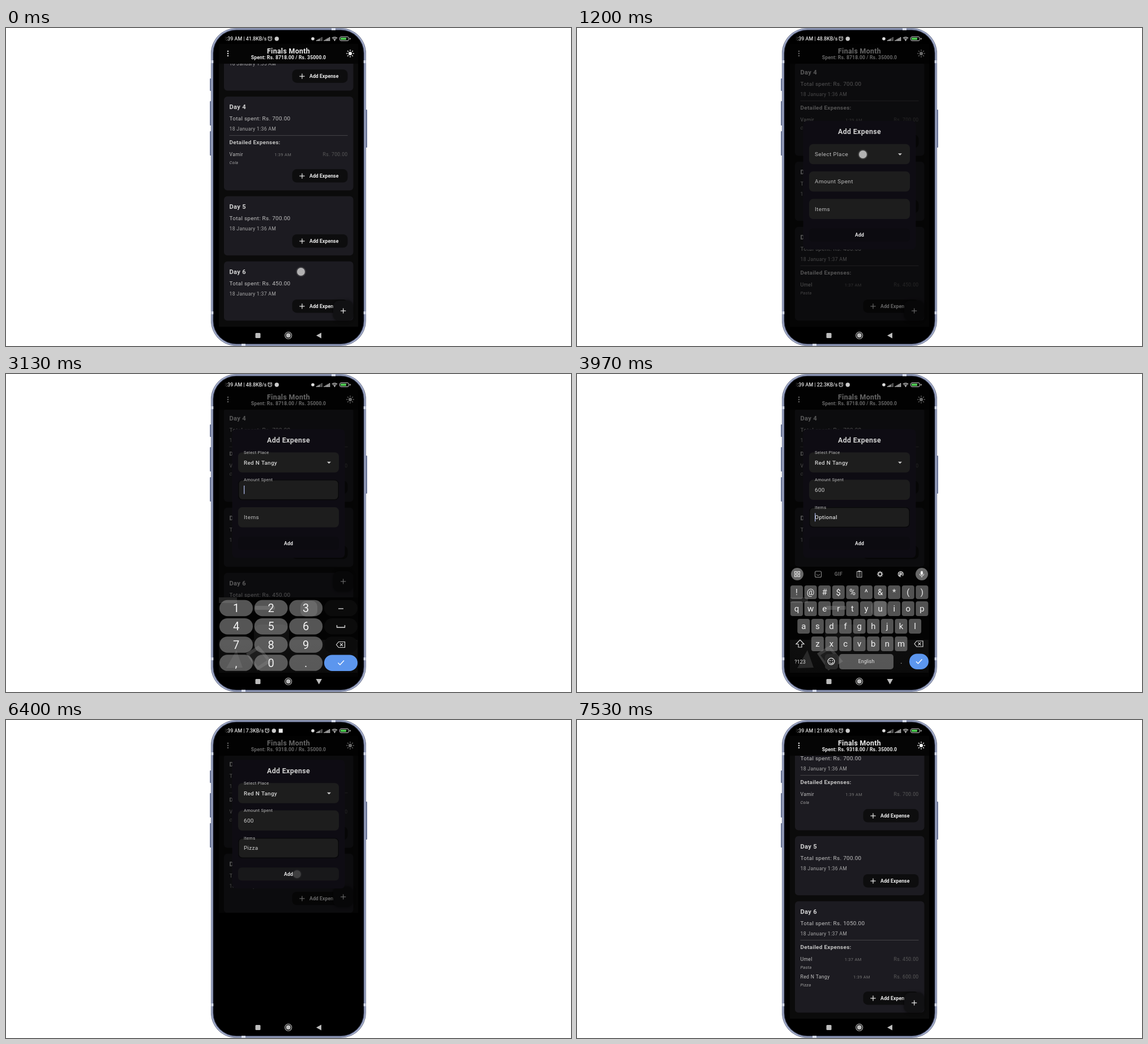
These frames come from a looping animation (998x561 px, 7.56 s). An HTML page with a canvas:

```html
<!DOCTYPE html>
<html lang="en">
<head>
<meta charset="utf-8">
<title>Expense tracker</title>
<style>
html, body { margin: 0; width: 100%; height: 100%; overflow: hidden; background: #fff; }
canvas { display: block; width: 998px; height: 561px; }
</style>
</head>
<body>
<canvas id="stage"></canvas>
<script>
const LOOP = 7560;
const canvas = document.getElementById('stage');
const dpr = window.devicePixelRatio || 1;
canvas.width = Math.round(998 * dpr);
canvas.height = Math.round(561 * dpr);
const g = canvas.getContext('2d');
const PLACE = 'Red N Tangy';

// x0, y0 -> x1, y1 between start and end
const touches = [
  [-50, 90, 521, 430], [300, 620, 521, 430, 521, 370], [680, 810, 555, 491],
  [1195, 1300, 505, 223], [1730, 1800, 470, 283], [1990, 2100, 500, 271],
  [3140, 3230, 530, 445], [3300, 3380, 468, 509], [3450, 3540, 468, 509],
  [3770, 3860, 460, 252], [4370, 4450, 394, 476], [5130, 5190, 609, 414],
  [5210, 5260, 560, 414], [5280, 5340, 425, 476], [5360, 5410, 425, 476],
  [5425, 5470, 400, 445], [6100, 6415, 514, 272], [6700, 7050, 521, 430, 521, 399]
].map(([start, end, x0, y0, x1 = x0, y1 = y0]) => ({ start, end, x0, y0, x1, y1 }));

const linear = (t, a, b) => Math.min(1, Math.max(0, (t - a) / (b - a)));
const ease = (t, a, b) => 1 - (1 - linear(t, a, b)) ** 3;
const mix = (a, b, p) => a + (b - a) * p;
const step = (t, pairs) => pairs.reduce((value, [at, next]) => t >= at ? next : value, '');

function box(x, y, w, h, r, fill) {
  g.fillStyle = fill;
  g.beginPath();
  g.roundRect(x, y, w, h, r);
  g.fill();
}
function disc(x, y, r, fill) {
  g.fillStyle = fill;
  g.beginPath();
  g.arc(x, y, r, 0, 7);
  g.fill();
}
function ring(x, y, r, color, width = 1, from = 0, to = 7) {
  g.strokeStyle = color;
  g.lineWidth = width;
  g.beginPath();
  g.arc(x, y, r, from, to);
  g.stroke();
}
function poly(points, fill) {
  g.fillStyle = fill;
  g.beginPath();
  points.forEach(([x, y]) => g.lineTo(x, y));
  g.closePath();
  g.fill();
}
function line(points, color, width = 1) {
  g.strokeStyle = color;
  g.lineWidth = width;
  g.beginPath();
  points.forEach(([x, y], i) => i ? g.lineTo(x, y) : g.moveTo(x, y));
  g.stroke();
}
function setFont(size, weight, gap, style = '') {
  g.font = `${style} ${weight} ${size}px Roboto, sans-serif`;
  g.letterSpacing = gap + 'px';
}
// y is the middle of the capitals
function text(s, x, y, size, color, { weight = 400, gap = 0.31, align = 'left', style } = {}) {
  setFont(size, weight, gap, style);
  g.textAlign = align;
  g.fillStyle = color;
  g.fillText(s, x, y + size * 0.36);
}
function plus(x, y, r, color) {
  line([[x - r, y], [x + r, y]], color, 1.2);
  line([[x, y - r], [x, y + r]], color, 1.2);
}
function clipped(x, y, w, h, draw) {
  g.save();
  g.beginPath();
  g.rect(x, y, w, h);
  g.clip();
  draw();
  g.restore();
}
function faded(alpha, draw) {
  if (alpha <= 0) return;
  g.save();
  g.globalAlpha *= alpha;
  draw();
  g.restore();
}

function phone() {
  g.fillStyle = '#fff';
  g.fillRect(0, 0, 998, 561);
  for (const [x, y, h] of [[360, 89, 22], [360, 129, 43], [360, 182, 43], [634.5, 144, 67]])
    box(x, y, 3.5, h, 1, '#727c9d');
  box(362, 0, 274, 561, 45, '#59617c');
  box(362.8, 0.8, 272.4, 559.4, 44, '#a6b0cf');
  box(365, 2.6, 268, 555.8, 42, '#4a516a');
  for (const y of [57, 500]) {
    box(362.5, y, 4, 5, 0, '#d3d9e9');
    box(631.5, y, 4, 5, 0, '#d3d9e9');
  }
  box(575, 0, 7, 4, 0, '#d3d9e9');
  box(416, 557, 7, 4, 0, '#d3d9e9');
  box(366.5, 4, 265, 553, 40, '#000');
}

function statusBar(t) {
  const speed = step(t, [[0, '41.8'], [830, '48.8'], [3400, '22.3'], [5430, '7.3'], [6900, '21.6']]);
  const label = `1:39 AM | ${speed}KB/s`;
  clipped(387.5, 8, 90, 22, () => text(label, 384, 19, 8.8, '#e4e4e4', { weight: 500, gap: 0 }));
  setFont(8.8, 500, 0);
  const x = 390 + g.measureText(label).width;
  ring(x, 19, 3.2, '#ddd', 1.1);
  line([[x, 17], [x, 19.3], [x + 1.6, 19.3]], '#ddd', 0.8);
  line([[x - 4, 16.5], [x - 2, 14.7]], '#ddd');
  line([[x + 4, 16.5], [x + 2, 14.7]], '#ddd');
  disc(x + 12, 19, 3.7, '#ccc');
  if (t > 5430 && t < 6900) box(x + 20.5, 15.5, 7, 7, 0, '#eee');
  disc(542, 19, 2.8, '#ddd');
  for (const left of [548, 561.5])
    for (let i = 0; i < 5; i++)
      box(left + i * 2.3, 21.5 - i * 1.35, 1.5, 1.5 + i * 1.35, 0, i < 3 || left > 560 ? '#ddd' : '#777');
  for (const r of [2.5, 4.5, 6.5]) ring(580.5, 22.5, r, '#ddd', 1.1, -2.35, -0.79);
  disc(580.5, 22, 1, '#ddd');
  g.strokeStyle = '#ccc';
  g.lineWidth = 1;
  g.beginPath();
  g.roundRect(589.5, 15.5, 16, 7, 2.5);
  g.stroke();
  box(591, 17, 10, 4, 1, '#4fc653');
  box(607, 17.5, 1.5, 3, 1, '#ccc');
}

function header(t) {
  g.fillStyle = '#050505';
  g.fillRect(376, 28, 246, 35);
  for (const dy of [-4, 0, 4]) disc(392, 45 + dy, 1.2, '#eee');
  text('Finals Month', 499, 40.5, 12.4, '#f0f0f0', { weight: 700, align: 'center' });
  text(`Spent: Rs. ${t < 6350 ? 8718 : 9318}.00 / Rs. 35000.0`, 499, 52.3, 8.7, '#eee',
    { weight: 700, gap: 0.1, align: 'center' });
  disc(608, 45, 3.1, '#f4f4f4');
  for (let i = 0; i < 8; i++) {
    const c = Math.cos(i * Math.PI / 4), s = Math.sin(i * Math.PI / 4);
    line([[608 + c * 4.6, 45 + s * 4.6], [608 + c * 6.8, 45 + s * 6.8]], '#f4f4f4', 1.4);
  }
}

function expenseRow([name, time, price, item], y) {
  text(name, 394.5, y, 8.68, '#bdbdbd');
  setFont(8.68, 400, 0.31);
  const nameW = g.measureText(name).width, priceW = g.measureText(price).width;
  setFont(7.44, 400, 0.31);
  const gap = (209 - nameW - priceW - g.measureText(time).width) / 2;
  text(time, 394.5 + nameW + gap, y, 7.44, '#757575');
  text(price, 603.5 - priceW, y, 8.68, '#595959');
  text(item, 394.5, y + 14.3, 7.44, '#a5a5a5', { style: 'italic' });
}

function card(top, extra, { title, total, date, rows }) {
  const h = 104.5 + extra;
  box(385, top, 228.5, h, 6, '#1c1b21');
  text(title, 394.5, top + 18, 11.16, '#d0d0d0', { weight: 700 });
  text(`Total spent: Rs. ${total}.00`, 394.5, top + 38.3, 9.92, '#c2c2c2');
  text(date, 394.5, top + 57, 8.68, '#a8a8a8');
  clipped(385, top + 64, 228, Math.max(0, extra), () => {
    line([[394.5, top + 68.7], [603.5, top + 68.7]], '#4b4a4d', 0.9);
    text('Detailed Expenses:', 394.5, top + 81, 9.92, '#c4c4c4', { weight: 700 });
    rows.forEach((row, i) => expenseRow(row, top + 102.3 + i * 31));
  });
  const y = top + h - 25.3;
  box(505.5, y - 12, 98, 23.5, 8, '#0d0d0e');
  plus(523, y, 4.6, '#eee');
  text('Add Expense', 536, y, 8.7, '#eee', { weight: 700, gap: 0.06 });
}

function page(t, bottom) {
  const added = t >= 6350;
  const extra6 = 61 * ease(t, 30, 300) + (added ? 31 : 0);
  const scroll = 61 * ease(t, 300, 770) + 31 * ease(t, 6690, 7430);
  const rows6 = [['Umel', '1:37 AM', 'Rs. 450.00', 'Pasta']];
  if (added) rows6.push([PLACE, '1:39 AM', 'Rs. 600.00', 'Pizza']);
  const days = [
    [0, { title: 'Day 3', total: 500, date: '18 January 1:35 AM', rows: [] }],
    [61, { title: 'Day 4', total: 700, date: '18 January 1:36 AM',
      rows: [['Vamir', '1:39 AM', 'Rs. 700.00', 'Cola']] }],
    [0, { title: 'Day 5', total: 700, date: '18 January 1:36 AM', rows: [] }],
    [extra6, { title: 'Day 6', total: added ? 1050 : 450, date: '18 January 1:37 AM', rows: rows6 }]
  ];
  clipped(376, 63, 246, bottom - 63, () => {
    g.fillStyle = '#0b0b0b';
    g.fillRect(376, 63, 246, 464);
    let top = 6 - scroll;
    for (const [extra, day] of days) {
      card(top, extra, day);
      top += 104.5 + extra + 10.4;
    }
    g.save();
    g.shadowColor = '#000a';
    g.shadowBlur = 5 * dpr;
    box(578, bottom - 46, 35, 35.5, 10, '#111113');
    g.restore();
    plus(595.7, bottom - 28, 4.6, '#eee');
  });
  header(t);
}

function field(top, label, value, { float = 0, focus = false, caret = false, hint = '', weight = 400 }) {
  const h = 35.5, mid = top + h / 2;
  if (focus) {
    box(410, top, 178, h + 0.5, 7, '#08080a');
    box(411.5, top + 1.2, 175, h - 2.4, 6, '#1d1d1d');
  } else box(410, top, 178, h, 7, '#1d1d1d');
  text(label, 420, mix(mid, top, float), mix(9.92, 7.5, float), '#bdbdbd', { gap: mix(0.42, 0.3, float) });
  text(value || hint, 420, mid, 9.92, '#d2d2d2', { weight: value ? weight : 500 });
  if (caret) {
    setFont(9.92, weight, 0.31);
    box(420 + g.measureText(value).width, mid - 7.5, 1.3, 15, 0.5, '#aab6e6');
  }
}

function dialog(t, top) {
  const onAmount = t >= 2060 && t < 3830, onItems = t >= 3830;
  const amount = step(t, [[3200, '6'], [3350, '60'], [3500, '600']]);
  const items = step(t, [[5160, 'P'], [5240, 'Pi'], [5310, 'Piz'], [5390, 'Pizz'], [5450, 'Pizza']]);
  const blinkOff = (t >= 2600 && t < 2870) || (t >= 4500 && t < 4630) || (t >= 5670 && t < 5900) || t > 6150;
  box(399.5, top, 199, 227, 7, '#0e0c13');
  text('Add Expense', 499, top + 19, 12.4, '#d0d0d0', { weight: 700, align: 'center' });
  const picked = t >= 1760;
  field(top + 41, 'Select Place', picked ? PLACE : '', { float: ease(t, 1760, 1930), weight: 500 });
  poly([[567, top + 57.4], [574, top + 57.4], [570.5, top + 61]], '#ccc');
  field(top + 89.3, 'Amount Spent', amount,
    { float: ease(t, 2060, 2200), focus: onAmount, caret: onAmount && !blinkOff });
  field(top + 137.8, 'Items', items,
    { float: ease(t, 3830, 3960), focus: onItems, caret: onItems && !blinkOff, hint: t > 3900 ? 'Optional' : '' });
  box(410, top + 190, 178, 23, 6, '#0c0b10');
  faded(linear(t, 6100, 6250), () => box(410, top + 190, 178, 23, 6, '#18181a'));
  text('Add', 499, top + 201.3, 8.7, '#e6e6e6', { weight: 700, gap: 0.06, align: 'center' });
}

function placeMenu(t) {
  const alpha = linear(t, 1215, 1330) * (1 - linear(t, 1790, 1930));
  const names = ['Umel', 'Vamir', PLACE, 'Canteen', 'Bakery', 'Grocery', 'Snack Bar', 'Other'];
  faded(alpha, () => clipped(400, 203, 200, mix(40, 252, ease(t, 1215, 1430)), () => {
    box(403, 204, 192, 250, 4, '#19181e');
    names.forEach((name, i) => text(name, 420, 223 + i * 30, 9.92, '#d2d2d2', { weight: 500 }));
  }));
}

function keyboardPhoto(top) {
  g.fillStyle = '#030303';
  g.fillRect(376, top, 246, 527 - top + 8);
  const x = 376, y = 394;
  const glow = g.createLinearGradient(0, y, 0, 527);
  glow.addColorStop(0, '#151515');
  glow.addColorStop(1, '#0b0b0b');
  box(x, y, 32, 10, 0, '#222');
  box(x + 64, y + 15, 35, 7, 2, '#343434');
  box(x + 62, y + 48, 62, 48, 12, glow);
  box(x + 144, y + 6, 30, 28, 10, '#303030');
  box(x, y + 75, 245, 58, 0, glow);
  poly([[424, 493], [446, 479], [470, 507], [444, 523]], '#393939');
  poly([[430, 496], [446, 486], [461, 505], [445, 516]], '#1d1d1d');
  poly([[389, 519], [407, 487], [418, 518]], '#292929');
}

function isPressed(t, x, y, w, h) {
  return touches.some(p => t >= p.start && t < p.end && Math.abs(p.x0 - x) < w / 2 && Math.abs(p.y0 - y) < h / 2);
}
function key(t, x, y, w, h, r, label, size, fill) {
  box(x - w / 2, y - h / 2, w, h, r, isPressed(t, x, y, w, h) ? '#aaac' : fill);
  text(label, x, y, size, '#f2f2f2', { gap: 0, align: 'center' });
}
function checkMark(x, y) {
  line([[x - 5, y], [x - 1.5, y + 3.5], [x + 5.5, y - 4]], '#fff', 1.4);
}
function backspace(x, y) {
  g.strokeStyle = '#ddd';
  g.lineWidth = 1.2;
  g.beginPath();
  for (const [dx, dy] of [[-8, 0], [-4, -5], [7, -5], [7, 5], [-4, 5]]) g.lineTo(x + dx, y + dy);
  g.closePath();
  g.stroke();
  line([[x - 1.5, y - 2.5], [x + 3.5, y + 2.5]], '#ddd', 1.1);
  line([[x - 1.5, y + 2.5], [x + 3.5, y - 2.5]], '#ddd', 1.1);
}

function numberPad(t) {
  keyboardPhoto(394);
  ['123', '456', '789', ',0.'].forEach((row, r) => {
    const y = 413 + r * 32.2;
    [...row].forEach((label, c) => key(t, 406.5 + c * 61.6, y, 59, 28.5, 14.2, label, 20, 'rgba(150,150,150,.56)'));
    box(562, y - 14.2, 59, 28.5, 14.2, r === 3 ? '#5c96ee' : '#0b0b0b');
  });
  line([[587, 414], [596, 414]], '#ddd', 1.3);
  line([[584.5, 443], [584.5, 447], [598.5, 447], [598.5, 443]], '#ddd', 1.3);
  backspace(591.5, 477.5);
  checkMark(591.5, 509.6);
}

function toolbar() {
  const c = '#b4b4b4', y = 353;
  disc(389, y, 11, '#686868');
  disc(609, y, 11, '#686868');
  for (const dx of [-2.8, 2.8]) for (const dy of [-2.8, 2.8]) {
    g.strokeStyle = '#eee';
    g.lineWidth = 1;
    g.strokeRect(389 + dx - 1.8, y + dy - 1.8, 3.6, 3.6);
  }
  g.strokeStyle = '#8d8d8d';
  g.lineWidth = 1.1;
  g.beginPath();
  g.roundRect(420.5, 348, 11, 10.5, 2);
  g.stroke();
  ring(426, 352.5, 2.8, '#8d8d8d', 1, 0.2, 2.9);
  text('GIF', 462, y, 8.6, '#6b6b6b', { weight: 700, gap: 0.5, align: 'center' });
  g.strokeStyle = c;
  g.strokeRect(494.5, 348.5, 8.5, 10);
  box(496.5, 346.8, 4.5, 3, 1, c);
  for (const dy of [0, 2.2, 4.4]) line([[496.5, 351.8 + dy], [501, 351.8 + dy]], c, 0.9);
  ring(535.3, y, 3, c, 2.1);
  for (let i = 0; i < 8; i++) {
    const a = i * Math.PI / 4;
    disc(535.3 + Math.cos(a) * 4.4, y + Math.sin(a) * 4.4, 1, c);
  }
  disc(571.8, y, 5.2, c);
  for (const [dx, dy] of [[-3, 0], [-1.5, -2.7], [1.5, -2.7], [3, 0]]) disc(571.8 + dx, y + dy, 0.9, '#111');
  disc(573.5, 356.5, 2, '#111');
  box(607, 347.5, 4, 7, 2, '#eee');
  ring(609, 352.5, 3.8, '#eee', 1, 0, Math.PI);
  line([[609, 356.5], [609, 359]], '#eee');
}

function letterPad(t) {
  const caps = t >= 4400 && t < 5165;
  keyboardPhoto(340);
  toolbar();
  const rows = [['!@#$%^&*()', 388, 385], ['QWERTYUIOP', 388, 414], ['ASDFGHJKL', 400.3, 445], ['ZXCVBNM', 424.9, 476]];
  for (const [letters, x, y] of rows)
    [...letters].forEach((c, i) => key(t, x + i * 24.6, y, 22, y === 385 ? 24 : 26, 4,
      caps ? c : c.toLowerCase(), 15, 'rgba(145,145,145,.56)'));
  const arrow = [[394, 469], [401, 476.5], [397, 476.5], [397, 482], [391, 482], [391, 476.5], [387, 476.5]];
  if (caps) poly(arrow, '#eee');
  else line([...arrow, arrow[0]], '#ddd', 1.2);
  backspace(604, 476);
  text('?123', 394, 507.3, 9, '#ddd', { gap: 0, align: 'center' });
  box(438, 494, 23, 27, 5, '#2b2b2b');
  ring(449, 507, 5.8, '#eee', 1.3);
  ring(449, 507.8, 3, '#eee', 1.1, 0.1, 3);
  disc(447, 505.5, 0.9, '#eee');
  disc(451, 505.5, 0.9, '#eee');
  box(463, 494, 96, 27, 5, 'rgba(145,145,145,.56)');
  text('English', 511, 507.3, 8.8, '#e2e2e2', { gap: 0, align: 'center' });
  text('.', 573, 507, 12, '#ccc', { align: 'center' });
  box(587, 493.5, 34, 27.5, 13.7, '#5c96ee');
  checkMark(604, 507.2);
}

function keyboard(t) {
  if (t < 2100 || t >= 6380) return;
  const numeric = t < 3930;
  const drop = numeric ? 133 * (1 - ease(t, 2100, 2412)) : 187 * linear(t, 6170, 6380) ** 2;
  clipped(376, 300, 246, 234, () => {
    g.translate(0, drop);
    numeric ? numberPad(t) : letterPad(t);
  });
}

function navBar(t) {
  box(440.5, 538, 9, 9, 1.5, '#bdbdbd');
  ring(498.7, 542.3, 6, '#bdbdbd', 1.1);
  disc(498.7, 542.3, 4, '#bdbdbd');
  const keys = t >= 2130 && t < 6300;
  poly(keys ? [[547.5, 538], [558, 538], [552.8, 547.5]] : [[548, 542.5], [557, 537.5], [557, 547.5]], '#bdbdbd');
}

function drawTouches(t) {
  for (const p of touches) {
    if (t < p.start || t >= p.end) continue;
    const k = ease(t, p.start, p.end);
    const x = mix(p.x0, p.x1, k), y = mix(p.y0, p.y1, k);
    faded(1 - linear(t, p.end - 60, p.end), () => {
      disc(x, y, 9, 'rgba(120,120,120,.3)');
      disc(x, y, 7, 'rgba(205,205,205,.82)');
    });
  }
}

function draw(t) {
  g.setTransform(dpr, 0, 0, dpr, 0, 0);
  const bottom = 527 - 133 * ease(t, 2340, 2470) - 54 * ease(t, 4000, 4170) + 187 * linear(t, 6425, 6490);
  const shown = linear(t, 790, 960) * (1 - linear(t, 6415, 6500));
  phone();
  page(t, bottom);
  faded(shown, () => {
    g.fillStyle = 'rgba(0,0,0,.57)';
    g.fillRect(376, 28, 246, 499);
    dialog(t, (27 + Math.min(bottom, t > 6400 ? 340 : 527)) / 2 - 113.2);
    placeMenu(t);
  });
  keyboard(t);
  statusBar(t);
  navBar(t);
  drawTouches(t);
}

const began = performance.now();
function tick() {
  draw((performance.now() - began) % LOOP);
  requestAnimationFrame(tick);
}
tick();
</script>
</body>
</html>
```
